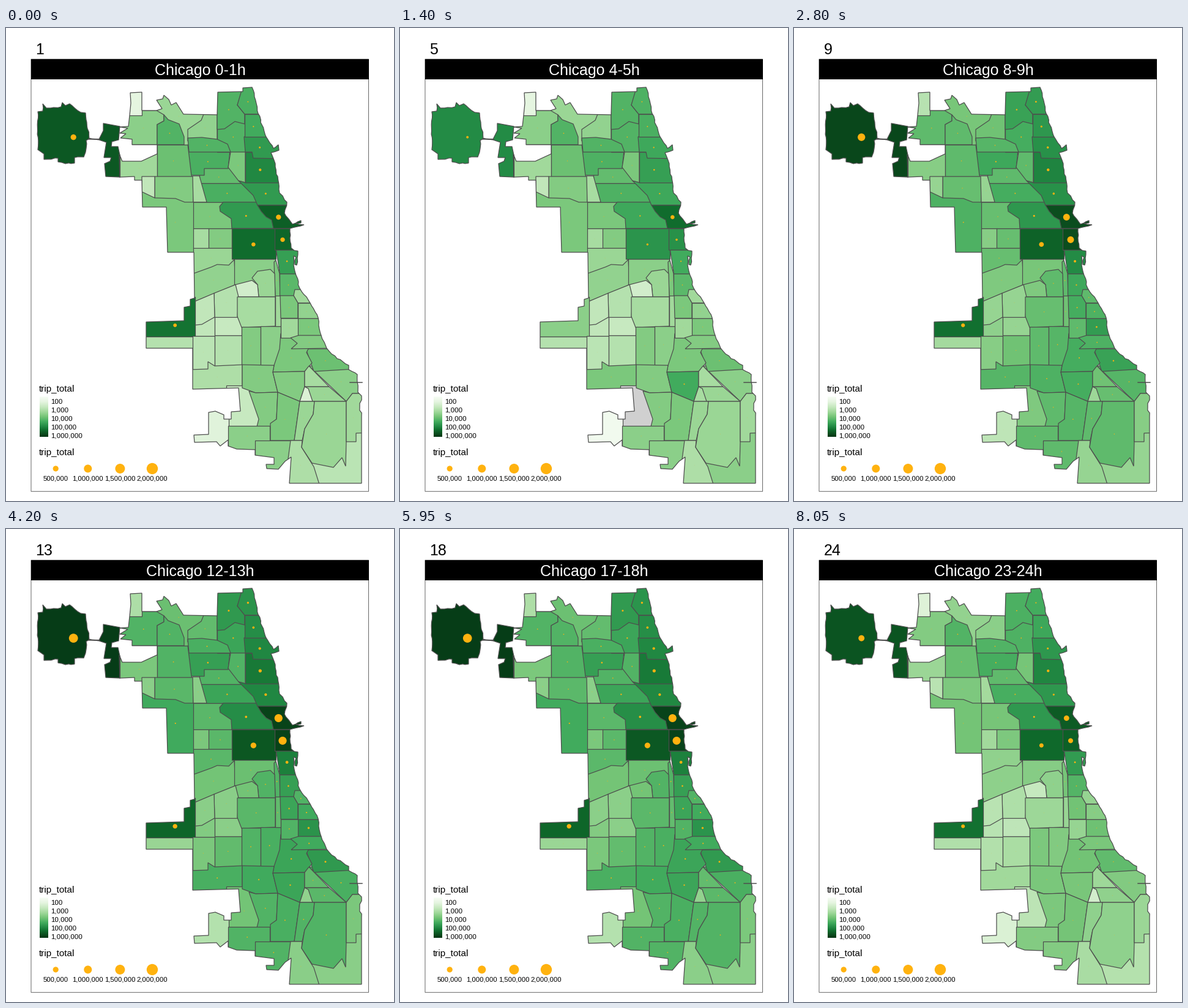
A matplotlib script for the animation above (8400 ms loop, 634x774 px).

```python
import numpy as np
import matplotlib.pyplot as plt
from matplotlib.animation import FuncAnimation
from matplotlib.colors import to_rgb
from matplotlib.patches import Circle, PathPatch, Polygon, Rectangle
from matplotlib.path import Path

W, H, DPI = 634, 774, 100
PX = 72 / DPI
EDGE, DOT, NO_DATA = "#4d4d4d", "#ffb20f", "#d0d0d0"
rng = np.random.default_rng(4)

# Colour scale over log10 of the trip total
LEVELS = [1.4, 2.0, 2.6, 3.2, 3.8, 4.4, 4.95, 5.42, 5.9, 6.2]
GREENS = np.array([to_rgb(c) for c in (
    "#f7fcf5", "#e5f5e0", "#c7e9c0", "#a1d99b", "#74c476",
    "#41ab5d", "#238b45", "#0f6b2c", "#0a4a1c", "#043615")])

plt.rcParams["font.family"] = "Liberation Sans"
fig = plt.figure(figsize=(W / DPI, H / DPI), dpi=DPI, facecolor="white")
ax = fig.add_axes([0, 0, 1, 1])
ax.axis("off")


def shade(level):
    return np.stack([np.interp(level, LEVELS, GREENS[:, k]) for k in range(3)], -1)


def radius(level):
    return 6.5 * 10 ** ((level - 6) / 2)


def label(x, y, text, size, **kw):
    return ax.text(x, y, text, fontsize=size * PX, va="baseline", **kw)


def points(*xy):
    return np.reshape(xy, (-1, 2)).astype(float)


def rough(line, size, step=5):
    """Break a line into short pieces and shake the new points."""
    out = []
    for a, b in zip(line[:-1], line[1:]):
        n = max(1, int(np.hypot(*(b - a)) / step))
        piece = a + (b - a) * np.arange(n)[:, None] / n
        piece[1:] += rng.uniform(-size, size, (n - 1, 2))
        out.append(piece)
    return np.vstack(out + [line[-1:]])


def closed(*lines):
    ring = np.vstack(lines)
    return Path(np.vstack([ring, ring[:1]]), closed=True)


# City limits: every district is clipped to them
north = points(
    204, 123, 203, 106, 222, 105, 222, 135, 246, 135, 255, 132, 246, 118,
    256, 116, 258, 110, 266, 117, 270, 126, 278, 122, 290, 141, 345, 142,
    346, 105, 387, 104, 387, 98, 402, 97)
lake = points(
    402, 97, 412, 140, 425, 178, 437, 197, 445, 191, 446, 200, 433, 204,
    440, 222, 447, 270, 459, 285, 455, 303, 468, 321, 482, 315, 482, 319,
    474, 320, 487, 322, 464, 328, 466, 360, 471, 364, 477, 365, 475, 388,
    472, 387, 474, 375, 470, 373, 470, 388, 480, 426, 497, 450, 510, 474,
    515, 503, 524, 524, 541, 541, 560, 552, 560, 559, 574, 567, 575, 596,
    581, 602, 578, 620, 581, 635)
south = points(
    581, 745, 463, 745, 466, 702, 456, 709, 445, 722, 426, 721, 425, 714,
    438, 714, 438, 703, 407, 699, 407, 690, 377, 689, 363, 684, 363, 674,
    350, 684, 344, 677, 308, 678, 307, 666, 331, 665, 331, 629, 342, 627,
    356, 633, 356, 640, 368, 640, 368, 628, 383, 627, 380, 589, 305, 591)
west = points(
    305, 524, 229, 524, 229, 481, 291, 479, 291, 457, 301, 455, 301, 444,
    308, 442, 307, 367, 264, 367, 262, 293, 223, 293, 222, 249, 210, 249,
    210, 243, 186, 244, 185, 206, 190, 218, 221, 218, 247, 206, 247, 191,
    206, 191, 206, 182, 187, 180, 196, 173, 186, 172, 199, 164, 186, 162,
    200, 161, 202, 143)
field = points(
    136, 181, 131, 184, 131, 197, 127, 211, 112, 212, 112, 221, 97, 222,
    85, 219, 85, 213, 62, 215, 62, 206, 52, 199, 52, 137, 60, 136, 60, 124,
    66, 131, 90, 129, 92, 122, 97, 127, 104, 124, 122, 138, 130, 139, 136, 181)
annex = points(
    152, 182, 159, 168, 159, 156, 186, 161, 184, 183, 173, 186, 172, 194,
    183, 194, 186, 208, 186, 244, 163, 243, 161, 222, 170, 218, 172, 212,
    160, 212, 164, 187, 152, 183)
limits = Path.make_compound_path(
    closed(north, rough(lake, 1.2), south, west),
    closed(rough(field, 1.0), annex))

districts = []


def area(night, day, *xy, dawn=None):
    """Paint a district over the earlier ones; two points give a box.

    Levels are tenths of log10; dawn=0 means no trips in that hour.
    """
    if len(xy) == 4:
        x0, y0, x1, y1 = xy
        xy = x0, y0, x1, y0, x1, y1, x0, y1
    if dawn is None:
        dawn = night - max(0, night - 42) / 2   # busy places calm down more
    evening = 0.6 * day + 0.4 * night
    levels = np.interp(range(1, 25), [1, 5, 9, 14, 18, 21, 25],
                       [night, dawn or night, day - 1.5, day + 0.5, day,
                        evening, night]) / 10
    if dawn == 0:
        levels[4] = np.nan
    shape = Polygon(points(*xy), ec=EDGE, lw=1.2 * PX, zorder=2)
    ax.add_patch(shape)
    shape.set_clip_path(limits, ax.transData)
    districts.append((shape, levels))


# North-west
area(57, 61, 40, 110, 186, 250)
area(33, 39, 245, 105, 330, 191)
area(35, 42, 186, 135, 246, 135, 258, 142, 258, 152, 247, 158, 247, 191, 186, 191)
area(20, 30, 198, 100, 222, 143)
area(42, 42, 247, 158, 258, 152, 258, 142, 265, 150, 283, 157, 291, 178,
     291, 191, 247, 191)
area(34, 40, 323, 141, 345, 141, 345, 185, 297, 185, 297, 166, 319, 151)
area(32, 37, 186, 200, 247, 250)
area(39, 42, 247, 191, 303, 243)
area(37, 44, 220, 265, 307, 368)
area(36, 41, 243, 243, 306, 243, 306, 285, 292, 285, 277, 279, 243, 278)
area(27, 35, 222, 243, 243, 243, 243, 278, 222, 268)
area(40, 42, 316, 225, 385, 254)
area(43, 45, 310, 254, 412, 285)
area(31, 35, 305, 242, 316, 242, 328, 285, 306, 285)
area(43, 46, 297, 191, 367, 191, 363, 230, 324, 230, 324, 241, 303, 241)

# North side
area(42, 45, 345, 150, 391, 203)
area(42, 43, 297, 180, 320, 179, 345, 182, 362, 190, 367, 203, 299, 203)
area(42, 47, 345, 100, 387, 100, 378, 126, 390, 141, 390, 157, 374, 153,
     357, 165, 345, 166)
area(43, 48, 387, 95, 420, 95, 420, 141, 390, 141, 378, 126)
area(37, 42, 367, 203, 391, 203, 391, 253, 380, 250, 363, 228)
area(37, 41, 306, 285, 369, 328)
area(47, 49, 355, 285, 440, 285, 440, 328, 369, 328, 368, 312, 350, 300, 349, 292)
area(47, 50, 380, 250, 391, 253, 470, 253, 470, 290, 411, 290, 404, 274)
area(50, 52, 391, 203, 470, 253)
area(47, 50, 389, 178, 460, 178, 460, 214, 404, 213, 402, 203, 391, 203)
area(44, 49, 390, 141, 440, 178)
area(56, 60, 411, 290, 500, 290, 500, 328, 437, 328, 434, 314, 425, 309,
     417, 300, dawn=54)

# West side and centre
area(31, 37, 306, 328, 332, 361)
area(36, 41, 331, 328, 369, 360)
area(33, 41, 306, 360, 373, 402)
area(34, 38, 300, 404, 336, 391, 345, 387, 364, 388, 373, 379, 375, 420, 300, 451)
area(35, 39, 373, 377, 440, 420)
area(54, 57, 369, 328, 441, 378)
area(55, 60, 439, 328, 480, 363)
area(46, 51, 441, 363, 480, 363, 480, 402, 447, 402)
area(37, 42, 438, 383, 441, 380, 447, 402, 448, 440, 440, 440)
area(33, 42, 402, 409, 411, 398, 432, 395, 439, 402, 440, 440, 413, 440, 411, 420)
area(24, 38, 375, 420, 402, 413, 411, 420, 413, 440, 378, 440)
area(29, 35, 340, 434, 375, 420, 380, 440, 378, 475, 341, 475)

# South-west side
area(27, 36, 305, 473, 341, 504)
area(27, 35, 300, 451, 340, 434, 341, 473, 320, 485, 300, 487)
area(26, 35, 341, 473, 385, 503)
area(31, 41, 378, 440, 440, 440, 440, 488, 385, 490, 378, 472)
area(53, 55, 225, 440, 309, 505, dawn=35)
area(29, 33, 225, 505, 306, 526)
area(28, 37, 305, 504, 341, 559)
area(29, 40, 341, 503, 386, 553)
area(36, 42, 385, 489, 416, 552)
area(35, 43, 416, 488, 449, 552)
area(30, 43, 300, 559, 330, 558, 330, 546, 341, 553, 386, 551, 386, 595,
     300, 595, dawn=37)

# South lakefront
area(41, 46, 447, 402, 490, 438)
area(32, 42, 472, 428, 500, 428, 500, 450, 477, 450, 470, 438)
area(32, 40, 440, 438, 449, 488)
area(37, 45, 448, 438, 470, 438, 477, 450, 477, 475, 449, 475)
area(34, 44, 477, 450, 520, 475)
area(35, 43, 495, 553, 600, 553, 600, 598, 566, 598, 556, 611)
area(39, 47, 490, 525, 570, 525, 570, 558, 503, 562)
area(37, 45, 449, 500, 470, 500, 494, 525, 491, 531, 500, 548, 488, 562,
     436, 563, 438, 552, 447, 525)
area(32, 42, 449, 475, 478, 507)
area(37, 48, 477, 475, 530, 503)
area(36, 44, 465, 507, 478, 503, 530, 503, 530, 524, 466, 525, 476, 516)

# Far south
area(26, 38, 360, 585, 413, 652, dawn=0)
area(36, 44, 386, 551, 438, 552, 436, 563, 444, 596, 408, 597, 386, 589)
area(36, 42, 397, 594, 408, 597, 444, 596, 442, 640, 432, 652, 410, 652, 413, 640)
area(36, 45, 436, 563, 488, 562, 488, 587, 480, 611, 444, 596, dawn=44)
area(31, 40, 488, 562, 495, 553, 528, 587, 488, 587)
area(33, 41, 488, 587, 528, 587, 556, 611, 501, 611)
area(22, 34, 488, 587, 494, 590, 501, 611, 480, 611, dawn=31)
area(21, 29, 300, 620, 364, 690, dawn=16)
area(35, 42, 363, 651, 431, 690)
area(35, 42, 407, 675, 467, 725)
area(37, 43, 444, 596, 480, 611, 471, 675, 432, 675, 432, 647, 442, 640)
area(33, 42, 480, 611, 504, 611, 502, 632, 488, 656, 484, 675, 471, 675)
area(28, 35, 490, 660, 600, 750, dawn=35)
area(30, 35, 465, 675, 484, 675, 483, 686, 503, 718, 513, 750, 455, 750)
area(33, 42, 504, 611, 556, 611, 556, 677, 555, 717, 549, 703, 535, 719,
     500, 712, 483, 686, 488, 656, 502, 632)
area(32, 37, 556, 611, 566, 598, 600, 598, 600, 662, 572, 663, 572, 677, 556, 677)

ax.add_patch(PathPatch(limits, fc="none", ec=EDGE, lw=1.25 * PX, zorder=3))
for x0, x1, y in ((135, 153, 182), (562, 582, 580)):
    ax.plot([x0, x1], [y, y], color=EDGE, lw=1.5 * PX, zorder=3)

# Dots sit at the centre of what stays visible of each district
grid = np.stack(np.meshgrid(range(0, W, 2), range(0, H, 2)), -1).reshape(-1, 2)
grid = grid[limits.contains_points(grid)]
owner = np.full(len(grid), -1)
for k, (shape, _) in enumerate(districts):
    owner[Path(shape.get_xy()).contains_points(grid)] = k
dots = [Circle(grid[owner == k].mean(axis=0), 1, fc=DOT, ec="none", zorder=4)
        for k in range(len(districts))]
for dot in dots:
    ax.add_patch(dot)

# Panel, heading and legends
ax.add_patch(Rectangle((41, 51), 551.5, 707.3, fc="none", ec="#666666",
                       lw=PX, snap=False))
ax.add_patch(Rectangle((41, 51.2), 551.8, 33.2, fc="black", ec="none", zorder=2))
count = label(48.5, 43, "", 25)
heading = label(317, 77, "", 25, color="white", ha="center", zorder=3)

label(54, 595, "trip_total", 15.2)
ramp = shade(np.linspace(LEVELS[0], LEVELS[-1], 66))[:, None, :]
ax.imshow(ramp, extent=(55, 69, 669, 603), aspect="auto", zorder=2)
for i in range(5):
    label(73, 615 + 14 * i, f"{10 ** (i + 2):,}", 11.5)

label(54, 699, "trip_total", 15.2)
for i in range(4):
    x, total = 81.2 + 52.6 * i, 500_000 * (i + 1)
    ax.add_patch(Circle((x, 721), radius(np.log10(total)), fc=DOT, ec="none"))
    label(x, 741, f"{total:,}", 11.3, ha="center")

ax.set_xlim(0, W)
ax.set_ylim(H, 0)


def draw(i):
    count.set_text(str(i + 1))
    heading.set_text(f"Chicago {i}-{i + 1}h")
    for (shape, levels), dot in zip(districts, dots):
        empty = np.isnan(levels[i])
        shape.set_facecolor(NO_DATA if empty else shade(levels[i]))
        dot.set_radius(0 if empty else radius(levels[i]))
    return []


anim = FuncAnimation(fig, draw, frames=24, interval=350, repeat=True,
                     repeat_delay=0)
plt.show()
```
